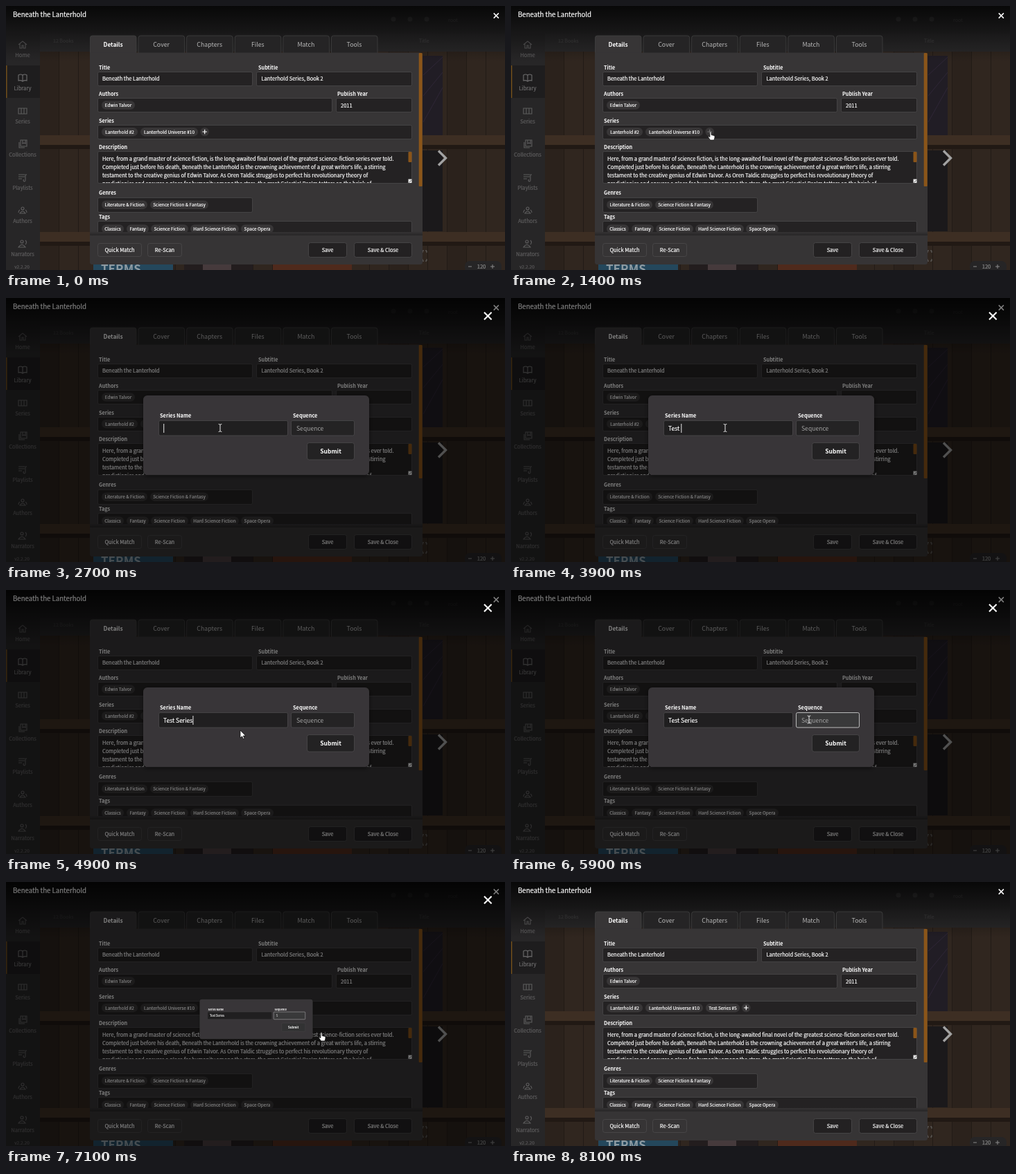
An HTML page for the animation above (8900 ms loop, 720 px wide and 382 px high).

```html
<!DOCTYPE html>
<html lang="en">
<head>
<meta charset="utf-8">
<title>Edit series</title>
<style>
  html, body { margin: 0; width: 100%; height: 100%; overflow: hidden; background: #000; }
  svg { display: block; width: 720px; height: 382px; }
  text { font-family: "Noto Sans CJK JP", "Noto Sans CJK SC", "Noto Sans CJK", "Noto Sans", sans-serif; white-space: pre; }
</style>
</head>
<body>
<svg id="stage" viewBox="0 0 720 382" xmlns="http://www.w3.org/2000/svg"></svg>
<script>
const LOOP = 8900, TICK = 100;
const BOOK = "Beneath the Lanterhold";

// Weight 500 is regular type thickened by a thin outline.
const text = (x, y, str, size = 7.5, { fill = "#fff", weight = 500, anchor = "start", id = "" } = {}) =>
  `<text x="${x}" y="${y}" font-size="${size}" fill="${fill}" font-weight="${weight === 700 ? 700 : 400}"` +
  (weight === 500 ? ` stroke="${fill}" stroke-width=".2"` : "") +
  ` text-anchor="${anchor}"${id && ` id="${id}"`}>${str.replace(/&/g, "&amp;")}</text>`;
const rect = (x1, y1, x2, y2, fill, extra = "") =>
  `<rect x="${x1}" y="${y1}" width="${x2 - x1}" height="${y2 - y1}" fill="${fill}" ${extra}/>`;
const line = (d, color, width = 1, extra = "") =>
  `<path d="${d}" fill="none" stroke="${color}" stroke-width="${width}" ${extra}/>`;
const group = (id, body, extra = "") => `<g id="${id}" ${extra}>${body}</g>`;

const label = (x, y, str, size = 7.25) => text(x, y, str, size, { weight: 700 });
const field = (x1, y1, x2, y2, fill = "#242223", id = "") =>
  rect(x1 + .5, y1 + .5, x2 - .5, y2 - .5, fill, `rx="2" stroke="#4b4a4b" stroke-width=".8" ${id && `id="${id}"`}`);
const chip = (x1, x2, cy, str) =>
  rect(x1, cy - 6.2, x2, cy + 6.2, "#383637", 'rx="6.2"') +
  text((x1 + x2) / 2, cy + 2.5, str, 6.45, { anchor: "middle" });
const button = (x1, y1, x2, y2, str, fill, size = 7.5, weight = 500, id = "") =>
  rect(x1 + .5, y1 + .5, x2 - .5, y2 - .5, fill, `rx="3" stroke="#4c4b4c" stroke-width=".8" ${id && `id="${id}"`}`) +
  text((x1 + x2) / 2, (y1 + y2) / 2 + size * .37, str, size, { weight, anchor: "middle" });
const cross = (x, y, r, width) =>
  line(`M${x - r} ${y - r}l${2 * r} ${2 * r}m0 ${-2 * r}l${-2 * r} ${2 * r}`, "#fff", width);

function shelves() {
  let s = "";
  for (let i = 0; i < 25; i++) {
    const x = 49 + i * 28;
    s += rect(x, 66, x + 28, 382, i % 3 ? "#30261f" : "#2b221c") + rect(x + 27, 66, x + 28, 382, "#221b16");
  }
  for (const y of [187, 327]) s += rect(49, y, 720, y + 14, "#3d2e23") + rect(49, y + 14, 720, y + 20, "#211914");
  s += rect(560, 72, 630, 187, "#211d25") + line("M602 100L630 74M602 130L630 96M602 168L630 118", "#33293b", .8) +
    rect(560, 209, 630, 326, "#1b191b");
  s += rect(126, 373, 241, 382, "#24475c") + text(137, 387, "TERMS", 17, { fill: "#8d9ba3", weight: 700 }) +
    rect(257, 373, 356, 382, "#231d1e") + rect(284, 374, 325, 382, "#463a3c") + rect(385, 373, 499, 382, "#4f2a1c");
  return s;
}

function sidebar() {
  const icons = [
    "M-6 0L0 -5L6 0M-4 -1V5H-1V1H1V5H4V-1",
    "M0 -4Q-3 -6 -6 -4V4Q-3 3 0 5Q3 3 6 4V-4Q3 -6 0 -4V5",
    "M-6 -4H6V4H-6ZM-2 -4V4M2 -4V4",
    "M-3 -6H6V3H-3ZM-5 -3V5H3M0 -6V-1L2 -2L4 -1V-6",
    "M-6 -4H3M-6 -1H3M-6 2H-1M4 4V-4H6M4 4a1.5 1.5 0 1 1 -2 -1",
    "M-2 -3a2 2 0 1 0 4 0a2 2 0 1 0 -4 0M-4 4Q0 -2 4 4ZM-6 3Q-6 0 -4 -1M6 3Q6 0 4 -1",
    "M-3 -3a2 2 0 1 0 4 0a2 2 0 1 0 -4 0M-6 5Q-1 -2 4 5ZM4 -5Q7 -2 4 1"
  ];
  const names = ["Home", "Library", "Series", "Collections", "Playlists", "Authors", "Narrators"];
  let s = rect(0, 40, 49, 382, "#272627") + rect(0, 86, 49, 133, "#1e1d1e") + rect(0, 86, 1.6, 133, "#6b4a1c");
  names.forEach((name, i) => {
    const y = 56 + i * 48, color = i === 1 ? "#6e6d6e" : "#5f5e5f";
    s += line(icons[i], color, 1.1, `transform="translate(24 ${y})"`) +
      text(24, y + 18, name, 7.6, { fill: color, anchor: "middle" });
  });
  return s + text(23, 380, "v2.2.20", 6.6, { fill: "#5a595a", anchor: "middle" });
}

function app() {
  const tiny = (x, y, str) => text(x, y, str, 7, { fill: "#434243" });
  return shelves() + sidebar() +
    rect(49, 40, 720, 66, "#2a292a") + tiny(68, 53, "12 Books") + tiny(596, 53, "Title") +
    rect(0, 0, 720, 40, "#282728") + tiny(638, 23, "root") +
    [559, 583, 607].map(x => `<circle cx="${x}" cy="19" r="3.5" fill="#3d3c3d"/>`).join("") +
    rect(0, 0, 720, 80, "url(#topShade)") +
    line("M624 209.5L634.5 220L624 230.5", "#a2a2a2", 3.4) +
    line("M601 357V354H603M605 354H607V357M601 366V369H603M605 369H607V366", "#666", 1) +
    rect(662, 369, 715, 386, "#262526", 'rx="7"') +
    text(686, 380, "120", 7.6, { fill: "#8a8a8a", anchor: "middle" }) +
    line("M667 377H672M699 377H705M702 374V380", "#8a8a8a", 1);
}

function editor() {
  let s = "";
  ["Details", "Cover", "Chapters", "Files", "Match", "Tools"].forEach((name, i) => {
    const x = 121 + i * 69.6, active = i === 0;
    s += `<path d="M${x + .5} 68V46q0 -3 3 -3H${x + 64}q3 0 3 3V68" fill="${active ? "#373536" : "#252425"}" stroke="#414041" stroke-width=".8"/>` +
      text(x + 33.5, 59, name, active ? 8.3 : 8.8, { anchor: "middle", weight: active ? 700 : 400, fill: active ? "#fff" : "#b8b8b8" });
  });
  s += rect(121, 67.5, 601, 374, "#373536", 'rx="4"') + rect(121, 67.5, 188, 76, "#373536");

  let form = label(134, 91.5, "Title") + field(132, 95, 356, 116) + text(139, 108.3, BOOK) +
    label(364, 91.5, "Subtitle") + field(361, 95, 586, 116) + text(368.5, 108.3, "Lanterhold Series, Book 2") +
    label(134, 130, "Authors") + field(132, 133, 471, 154) + chip(138, 186, 143.5, "Edwin Talvor") +
    label(478, 130, "Publish Year") + field(476, 133, 586, 154) + text(483, 146.8, "2011") +
    label(134, 168.5, "Series") + field(132, 172, 586, 193) +
    chip(138, 190, 182.2, "Lanterhold #2") + chip(194, 277, 182.2, "Lanterhold Universe #10") +
    group("newChip", chip(281, 330, 182.2, "Test Series #5")) +
    group("plus", '<circle r="6.3" fill="#383637"/>' + group("plusSign", line("M-3.3 0H3.3M0 -3.3V3.3", "#fff", 1.2)));

  const lines = [
    "Here, from a grand master of science fiction, is the long-awaited final novel of the greatest science-fiction series ever told.",
    `Completed just before his death, ${BOOK} is the crowning achievement of a great writer's life, a stirring`,
    "testament to the creative genius of Edwin Talvor. As Oren Taldic struggles to perfect his revolutionary theory of",
    "predictionics and ensures a place for humanity among the stars, the great Celestial Realm totters on the brink of"
  ];
  form += label(134, 206.5, "Description") + field(132, 210, 586, 257) +
    group("description", lines.map((l, i) => text(139, 223.7 + i * 12.1, l)).join(""), 'clip-path="url(#areaClip)"') +
    rect(580.5, 211, 585.5, 226, "#8b5519", 'rx="1"') + rect(580.5, 250.5, 585.5, 256, "#e8e8e8") +
    line("M581.5 255.5L585 252", "#555", .8) +
    label(134, 273.3, "Genres") + field(132, 277, 356, 299) +
    chip(138, 204, 287.7, "Literature & Fiction") + chip(208, 292, 287.7, "Science Fiction & Fantasy") +
    label(134, 308, "Tags") + field(132, 311, 586, 333);
  [[138, 170, "Classics"], [174, 206, "Fantasy"], [209, 263, "Science Fiction"],
   [266, 336, "Hard Science Fiction"], [339, 386, "Space Opera"]].forEach(([a, b, name]) => form += chip(a, b, 322.5, name));

  s += group("form", form, 'clip-path="url(#formClip)"');
  s += rect(595.7, 68, 600.7, 261, "#8b5519", 'rx="1"') +
    rect(121, 326, 601, 332, "url(#footShade)") + rect(121, 332, 601, 374, "#363435", 'rx="4"') +
    button(132, 343, 196, 363, "Quick Match", "#363435") + button(204, 343, 254, 363, "Re-Scan", "#363435") +
    button(436, 342, 492, 364, "Save", "#232122") + button(502, 342, 586, 364, "Save & Close", "#232122");
  return s + text(10, 16.4, BOOK, 9.64) + cross(707.3, 14, 3.6, 1.5);
}

const dialog = () =>
  rect(198, 141, 524, 256, "#373637", 'rx="6" filter="url(#shadow)"') +
  label(222, 173, "Series Name", 7.4) + label(414, 173, "Sequence", 7.4) +
  field(220, 177, 407, 199.5, "#201f20") + field(411, 177, 503, 199.5, "#242324", "sequenceBox") +
  text(227, 191.7, "", 8.5, { id: "seriesText" }) +
  text(419, 191.7, "", 8.6, { id: "sequenceText", weight: 400 }) +
  rect(0, 182, .9, 195, "#fff", 'id="caret"') +
  button(434, 209, 503, 234.5, "Submit", "#232223", 8.5, 700, "submit");

const pointers =
  group("arrow", '<path d="M0 0V11L2.6 8.7L4.4 12.5L6 11.7L4.3 8H7.8Z" fill="#fff" stroke="#000" stroke-width=".7"/>') +
  group("hand", '<path d="M-1 1Q0 -.8 1 1V5L5 6Q6.5 6.5 6 8.5L5 12.5H-.5L-3.5 8Q-3.6 6.5 -1 8Z" fill="#fff" stroke="#111" stroke-width=".7"/>') +
  group("beam", line("M-2.3 -5.5Q0 -5.5 0 -4.3Q0 -5.5 2.3 -5.5M0 -4.5V4.5M-2.3 5.5Q0 5.5 0 4.3Q0 5.5 2.3 5.5", "#e8e8e8", 1));

const gradient = (id, stops) => `<linearGradient id="${id}" x1="0" y1="0" x2="0" y2="1">` +
  stops.map(([at, a]) => `<stop offset="${at}" stop-color="#000" stop-opacity="${a}"/>`).join("") + "</linearGradient>";

document.getElementById("stage").innerHTML =
  "<defs>" + gradient("topShade", [[0, .8], [1, 0]]) + gradient("footShade", [[0, 0], [1, .28]]) +
  `<clipPath id="formClip">${rect(121, 68, 596, 327, "#000")}</clipPath>` +
  `<clipPath id="areaClip">${rect(133, 211, 580, 256, "#000")}</clipPath>` +
  '<filter id="shadow" x="-10%" y="-20%" width="120%" height="150%"><feDropShadow dx="0" dy="2" stdDeviation="3" flood-opacity=".5"/></filter></defs>' +
  app() + editor() +
  group("modal", rect(0, 0, 720, 382, "#000", 'opacity=".5"') + group("dialog", dialog()) + cross(695.3, 26, 5.3, 2.1)) +
  pointers;

const $ = id => document.getElementById(id);
const show = (id, on) => $(id).setAttribute("display", on ? "inline" : "none");

// Each step holds until the next one: [time, value...]
const pointerSteps = [
  [0, ""], [1000, "hand", 281, 178], [1200, "hand", 284, 179], [1300, "hand", 286, 180], [1400, "hand", 288, 181.5],
  [1700, "arrow", 288, 181], [1800, "beam", 291, 187], [2000, "beam", 299, 188], [2200, "beam", 309, 188],
  [4800, "beam", 318, 189], [4900, "arrow", 338, 203], [5000, "arrow", 368, 211], [5100, "arrow", 396, 206],
  [5200, "beam", 420, 191], [5300, "beam", 430, 187.5],
  [6500, "beam", 432, 190], [6600, "arrow", 438, 201], [6700, "hand", 446, 211], [6800, "hand", 452, 216], [6900, "hand", 455, 217.5],
  [7200, "beam", 456, 222], [7800, "beam", 500, 216], [7900, "arrow", 602, 170], [8000, "arrow", 690, 128], [8100, ""]
];
const typing = [[0, 0], [3000, 1], [3200, 2], [3300, 3], [3500, 4], [3900, 5], [4000, 6], [4100, 7], [4200, 8], [4300, 9], [4400, 10], [4500, 11]];
const scaleSteps = [[0, .847], [1800, .97], [1900, 1], [7100, .5]];
const plusSteps = [[0, 1], [700, .6], [800, .3], [7200, 1]];
const blinkSteps = [[0, 0], [1700, 1], [2200, 0], [2700, 1], [5000, 0], [5300, 1], [5900, 0], [6100, 1], [6600, 0]];
const at = (steps, t) => steps.filter(s => s[0] <= t).pop().slice(1);

function draw(t) {
  const open = t >= 1700 && t < 7200, added = t >= 7200;
  show("modal", open);
  show("newChip", added);
  $("plus").setAttribute("transform", `translate(${added ? 339.3 : 286.7} 182)`);
  $("plusSign").setAttribute("opacity", at(plusSteps, t)[0]);

  const [kind, x, y] = at(pointerSteps, t);
  for (const id of ["arrow", "hand", "beam"]) show(id, id === kind);
  if (kind) $(kind).setAttribute("transform", `translate(${x} ${y})`);
  if (!open) return;

  $("dialog").setAttribute("transform", `translate(361 198.5) scale(${at(scaleSteps, t)[0]}) translate(-361 -198.5)`);
  const inSequence = t >= 5300, filled = t >= 6100;
  $("seriesText").textContent = "Test Series".slice(0, at(typing, t)[0]);
  $("sequenceText").textContent = filled ? "5" : "Sequence";
  $("sequenceText").setAttribute("fill", filled ? "#f2f2f2" : "#a0a0a0");
  $("sequenceBox").setAttribute("stroke", inSequence ? "#dcdcdc" : "#4b4b4c");
  $("sequenceBox").setAttribute("fill", inSequence ? "#39393a" : "#242324");
  $("submit").setAttribute("fill", t >= 6700 ? "#323233" : "#232223");
  show("caret", at(blinkSteps, t)[0]);
  const typed = $("seriesText").getComputedTextLength();
  $("caret").setAttribute("x", inSequence ? (filled ? 424 : 419) : 227.3 + typed);
}

const start = performance.now();
function frame() {
  const t = (performance.now() - start) % LOOP;
  draw(Math.floor(t / TICK) * TICK);
  requestAnimationFrame(frame);
}
frame();
</script>
</body>
</html>
```
